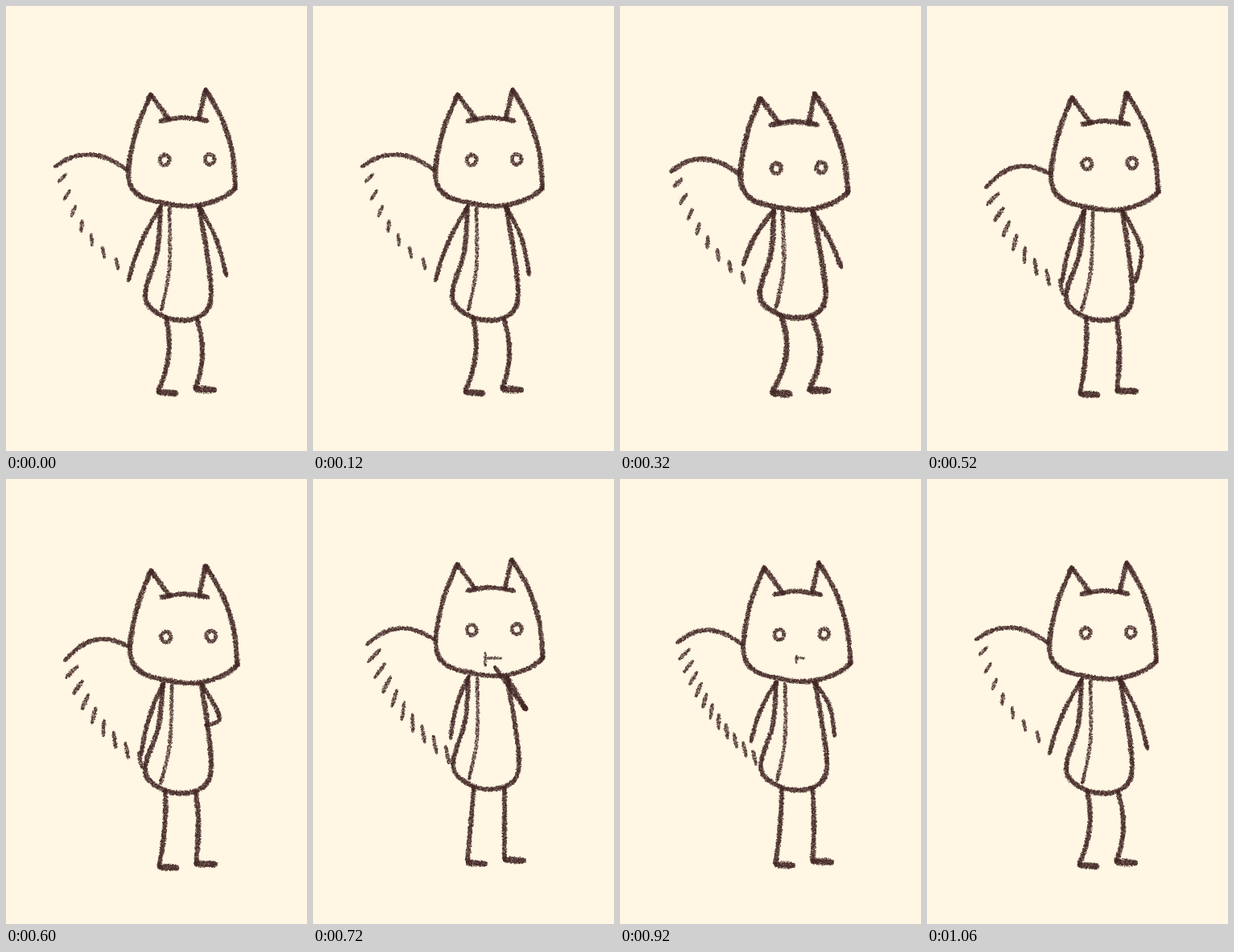
Animation of 374 by 554 pixels, one loop 1120 ms. Source, as an HTML page with a canvas:

```html
<!DOCTYPE html>
<html lang="en">
<head>
<meta charset="utf-8">
<title>Crayon cat</title>
<style>
  html, body { margin: 0; width: 100%; height: 100%; overflow: hidden; background: #fff6e3; }
  canvas { display: block; width: 374px; height: 554px; }
</style>
</head>
<body>
<canvas id="stage" width="374" height="554"></canvas>
<script>
const W = 374, H = 554, LOOP = 1120, COUNT = 17;
const PAPER = '#fff6e3', INK = '#452a28';

// One figure, in "x,y x,y" key points; a slash starts a new stroke.
const HEAD = '180,110 162,155 152,208 163,234 194,245 232,249 266,240 285,227' +
  '/285,227 281,182 268,140 248,104/180,110 203,142/192,143 220,139 250,143/248,104 239,141';
const BODY = '192,250 188,305 173,362 195,386 225,391 248,381 255,358 250,310 240,250';
const SEAM = '203,251 203,325 193,379';
const LEGS = '199,388 189,480/237,389 235,477';
const FEET = '190,481 211,482/236,477 259,478';
const EYES = '197,192 253,191';

// Each pose shifts the figure at four heights and leans the loose parts.
const LEVELS = [104, 248, 388, 480];
const poses = [
  { shift: '0,0 0,0 0,0 0,0', bend: 8, weight: 6.6, hand: [152, 342],
    tail: [61, 200], fur: 7, furEnd: [138, 321], dash: 13 },
  { shift: '-6,5 -1,5 1,-3 0,1', bend: 12, weight: 7.4, hand: [153, 322], gaze: 5,
    tail: [63, 206], fur: 8, furEnd: [153, 338], dash: 13 },
  { shift: '0,4 3,5 -1,0 1,2', bend: 3, weight: 6.8, hand: [168, 343],
    tail: [73, 226], fur: 8, furEnd: [167, 350], dash: 19 },
  { shift: '-1,-4 1,-4 1,-5 3,-3', bend: 0, weight: 6.3, hand: [171, 323], mouth: 1,
    tail: [67, 206], fur: 9, furEnd: [167, 343], dash: 21 },
  { shift: '-1,0 2,3 2,-4 4,-1', bend: 2, weight: 6.5, hand: [163, 327], mouth: .5,
    tail: [71, 204], fur: 11, furEnd: [167, 347], dash: 17 }
];

// Step, elbow and hand of the arm that moves on every step.
const reach = [
  [0, '261,290 274,336'], [3, '258,288 266,334'], [5, '260,290 275,325'],
  [8, '266,302 259,343'], [11, '264,286 226,234'], [14, '260,282 267,320'], [16, '261,290 274,336']
];

const points = text => text.split(' ').map(p => p.split(',').map(Number));
const mix = (a, b, t) => a + (b - a) * t;
const mixPoint = (a, b, t) => [mix(a[0], b[0], t), mix(a[1], b[1], t)];
const add = ([x, y], dx, dy) => [x + dx, y + dy];

function seeded(seed) {
  return () => {
    seed = (seed + 0x6d2b79f5) | 0;
    let t = Math.imul(seed ^ (seed >>> 15), 1 | seed);
    t = (t + Math.imul(t ^ (t >>> 7), 61 | t)) ^ t;
    return ((t ^ (t >>> 14)) >>> 0) / 4294967296;
  };
}

// Moves a point by the pose's shift at its height.
function warp(p, shift) {
  const i = Math.max(0, LEVELS.findLastIndex((y, n) => n < 3 && y <= p[1]));
  const t = Math.min(1, Math.max(0, (p[1] - LEVELS[i]) / (LEVELS[i + 1] - LEVELS[i])));
  return add(p, ...mixPoint(shift[i], shift[i + 1], t));
}

// A curve from a to b whose middle is pushed aside.
function bow(a, b, dx, dy) {
  return [a, add(mixPoint(a, b, .25), dx * .75, dy * .75), add(mixPoint(a, b, .5), dx, dy),
    add(mixPoint(a, b, .75), dx * .75, dy * .75), b];
}

// Catmull-Rom curve sampled at an even step.
function sample(pts, step = .8) {
  const out = [];
  for (let i = 0; i < pts.length - 1; i++) {
    const b = pts[i], c = pts[i + 1], a = pts[i - 1] || b, d = pts[i + 2] || c;
    const n = Math.max(1, Math.round(Math.hypot(c[0] - b[0], c[1] - b[1]) / step));
    for (let j = 0; j < n; j++) {
      const t = j / n;
      out.push([0, 1].map(k => b[k] + t / 2 * (c[k] - a[k] +
        t * (2 * a[k] - 5 * b[k] + 4 * c[k] - d[k] + t * (3 * (b[k] - c[k]) + d[k] - a[k])))));
    }
  }
  out.push(pts[pts.length - 1]);
  return out;
}

// Crayon line: a soft core under scattered grains.
function crayon(ctx, pts, width, density = 1, taper = .25) {
  const line = sample(pts), last = line.length - 1;
  const random = seeded(Math.round(pts[0][0] * 97 + pts[0][1] * 31 + last));
  const phase = random() * 6;
  ctx.fillStyle = ctx.strokeStyle = INK;
  ctx.lineCap = ctx.lineJoin = 'round';
  ctx.lineWidth = width * .65;
  ctx.globalAlpha = .5 * density * density;
  ctx.beginPath();
  line.forEach(p => ctx.lineTo(...p));
  ctx.stroke();
  line.forEach(([x, y], i) => {
    const end = Math.min(1, Math.min(i, last - i) / 8);
    const press = (1 - taper * (1 - end)) * (.93 + .07 * Math.sin(i * .12 + phase));
    const grains = 1.3 * density * press * width + random();
    for (let g = 1; g < grains; g++) {
      const angle = random() * Math.PI * 2;
      const r = Math.sqrt(random()) * width * press / 2 + random() * .5;
      const size = .8 + random() * .5;
      ctx.globalAlpha = .5 + random() * .45;
      ctx.fillRect(x + Math.cos(angle) * r - size / 2, y + Math.sin(angle) * r - size / 2, size, size);
    }
  });
  ctx.globalAlpha = 1;
}

function ring([x, y], r) {
  return Array.from({ length: 13 }, (_, i) => {
    const a = i * Math.PI / 6;
    return [x + r * Math.cos(a), y + r * 1.08 * Math.sin(a)];
  });
}

// Fur dashes follow a bulging line and turn upright on the way down.
function fur(tip, end, count, length) {
  const start = add(tip, 9, 14), dx = end[0] - start[0], dy = end[1] - start[1];
  const side = 12 / Math.hypot(dx, dy);
  return Array.from({ length: count }, (_, i) => {
    const t = i / (count - 1), bulge = 4 * t * (1 - t) * side;
    const p = add(mixPoint(start, end, t), -dy * bulge, dx * bulge);
    const angle = mix(45, 102, Math.min(1, t * 1.3)) * Math.PI / 180;
    const ux = Math.cos(angle) * length / 2, uy = Math.sin(angle) * length / 2;
    return [add(p, -ux, uy), add(p, ux, -uy)];
  });
}

function blank() {
  const canvas = document.createElement('canvas');
  canvas.width = W;
  canvas.height = H;
  return canvas;
}

function drawFigure({ shift, bend, weight, hand, tail, fur: count, furEnd, dash, gaze = 0, mouth = 0 }) {
  const canvas = blank(), ctx = canvas.getContext('2d'), shifts = points(shift);
  const place = text => text.split('/').map(s => points(s).map(p => warp(p, shifts)));
  const put = (lines, width, density, taper) => lines.forEach(l => crayon(ctx, l, width, density, taper));

  put([bow(tail, warp([151, 204], shifts), -2, -17)], weight * .9, .95, .4);
  put(fur(tail, furEnd, count, dash), weight * .85, .85, .45);
  put(place(LEGS).map(([hip, ankle]) => bow(hip, ankle, bend, 0)), weight);
  put(place(FEET), weight * 1.45, 1.1, .3);
  put(place(BODY), weight);
  put(place(SEAM), weight * .75, .75, .4);
  put([bow(warp([193, 249], shifts), hand, -4, -2)], weight * .9, 1, .4);
  put(place(HEAD), weight, 1, .15);
  place(EYES)[0].forEach(p => crayon(ctx, ring(add(p, 0, gaze), 6), weight * .78, .85, 0));
  if (mouth) {
    const x = 224 - 10 * mouth;
    put([[[x, 224 - 8 * mouth], [x, 224 + 9 * mouth]], [[x, 223], [x + 20 * mouth, 223]]], 4, .75, .5);
  }
  return canvas;
}

function armAt(k, shoulder) {
  const next = Math.max(1, reach.findIndex(r => r[0] >= k));
  const [k0, from] = reach[next - 1], [k1, to] = reach[next];
  const goal = points(to);
  return [shoulder, ...points(from).map((p, i) => mixPoint(p, goal[i], (k - k0) / (k1 - k0)))];
}

const figures = poses.map(drawFigure);
const frames = Array.from({ length: COUNT }, (_, k) => {
  // Drawings are held on threes.
  const index = Math.max(0, Math.ceil(k / 3) - 1) % poses.length;
  const { shift, weight } = poses[index];
  const canvas = blank(), ctx = canvas.getContext('2d');
  ctx.fillStyle = PAPER;
  ctx.fillRect(0, 0, W, H);
  ctx.drawImage(figures[index], 0, 0);
  crayon(ctx, armAt(k, warp([240, 250], points(shift))), weight * .9, 1, .4);
  return canvas;
});

// Fifteen steps a second, snapped down to 20 ms.
const starts = frames.map((_, k) => Math.floor(k * 10 / 3) * 20);
const stage = document.getElementById('stage').getContext('2d');
const origin = performance.now();
let shown = -1;

function tick() {
  const t = (performance.now() - origin) % LOOP;
  const k = starts.findLastIndex(s => s <= t);
  if (k !== shown) stage.drawImage(frames[shown = k], 0, 0);
  requestAnimationFrame(tick);
}
tick();
</script>
</body>
</html>
```
